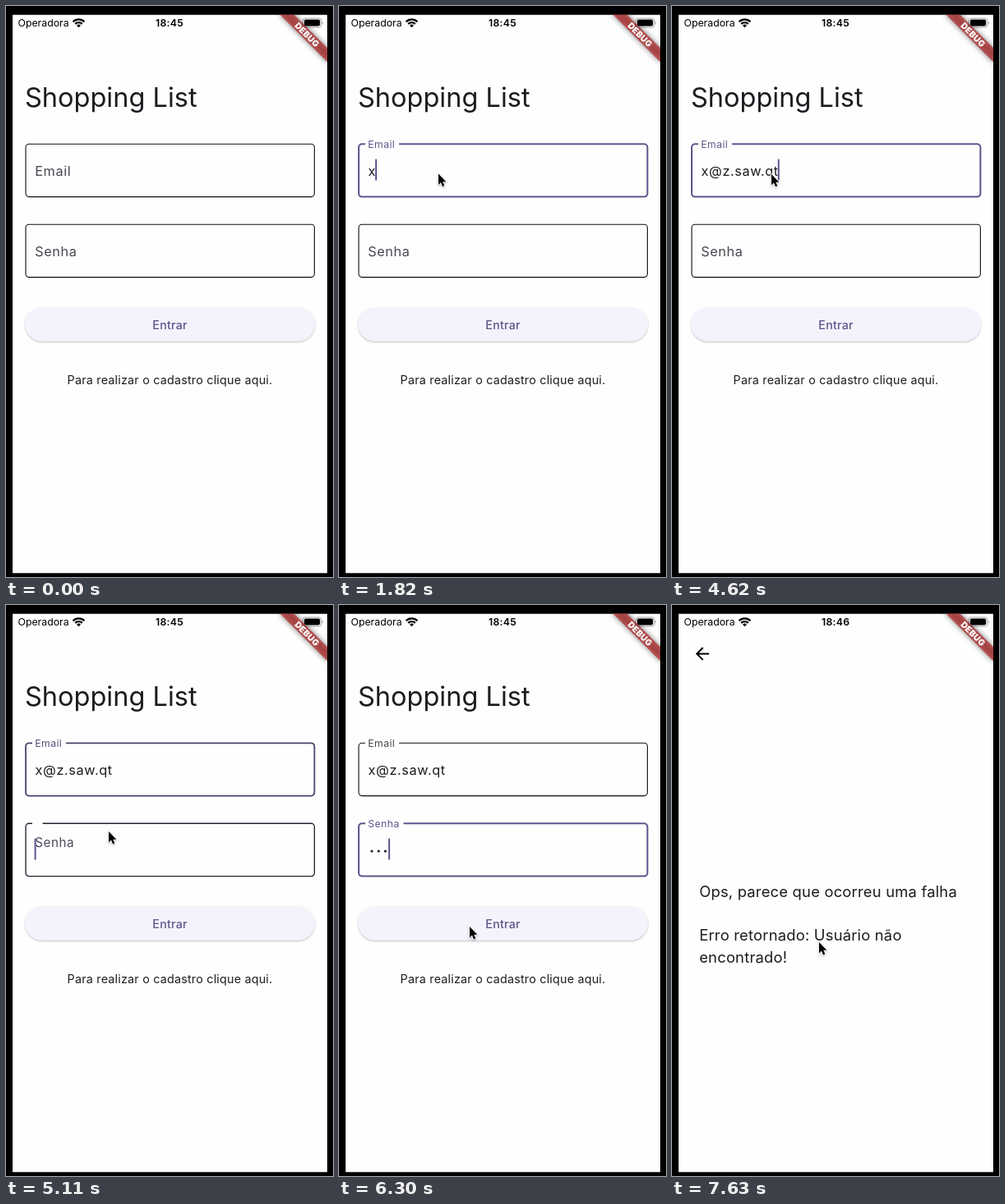
Recreate the animation shown at these times as an HTML page. Size 398 by 696 pixels, loop 8 s.

```html
<!DOCTYPE html>
<html lang="pt-BR">
<head>
<meta charset="utf-8">
<title>Login</title>
<style>
html, body { margin: 0; width: 100%; height: 100%; overflow: hidden; background: #000; }
svg { display: block; width: 100vw; height: 100vh; }
text { font-family: Inter, Roboto, sans-serif; font-optical-sizing: none; fill: #1d1b20; white-space: pre; }
.field { font-size: 16.3px; letter-spacing: .6px; }
.small { font-size: 14.3px; letter-spacing: .22px; text-anchor: middle; }
.page { font-size: 18.4px; letter-spacing: .2px; }
.status { font-size: 12.3px; fill: #000; }
</style>
</head>
<body>
<svg viewBox="0 0 398 696">
  <defs>
    <clipPath id="screen"><rect x="8" y="10.5" width="383" height="681"/></clipPath>
    <clipPath id="pill"><rect x="23.3" y="367.5" width="352.6" height="41" rx="20.5"/></clipPath>
    <filter id="blur" x="-50%" y="-150%" width="200%" height="400%"><feGaussianBlur stdDeviation="3.9"/></filter>
    <filter id="lift" x="-5%" y="-20%" width="110%" height="150%">
      <feDropShadow dx="0" dy="1" stdDeviation="1" flood-opacity=".3"/>
    </filter>
    <filter id="soft" x="-50%" y="-50%" width="200%" height="200%">
      <feDropShadow dx="0" dy="1" stdDeviation=".8" flood-opacity=".35"/>
    </filter>
  </defs>
  <rect width="398" height="696"/>
  <g clip-path="url(#screen)">
    <rect x="8" y="10.5" width="383" height="681" fill="#fefefe"/>
    <g id="login">
      <text x="23" y="123" font-size="32.5">Shopping List</text>
      <g id="email"></g>
      <g id="senha" transform="translate(0 98)"></g>
      <rect x="23.3" y="367.5" width="352.6" height="41" rx="20.5" fill="#f5f2fc" filter="url(#lift)"/>
      <circle id="ripple" cx="160" cy="393" fill="#5f558c" clip-path="url(#pill)"/>
      <text class="small" x="199.6" y="393.5" font-weight="500" style="fill:#5f558c">Entrar</text>
      <text class="small" x="199.5" y="461">Para realizar o cadastro clique aqui.</text>
    </g>
    <g id="error">
      <path transform="translate(24.7 47.2) scale(1.021)" d="M20 11H7.83l5.59-5.59L12 4l-8 8 8 8 1.41-1.41L7.83 13H20z"/>
      <text class="page" x="33.2" y="356">Ops, parece que ocorreu uma falha</text>
      <text class="page" x="33.2" y="409">Erro retornado: Usuário não</text>
      <text class="page" x="33.2" y="435.5">encontrado!</text>
    </g>
    <g transform="translate(391 10.5) rotate(45)">
      <rect x="-41" y="28.6" width="82" height="12.2" opacity=".5" filter="url(#blur)"/>
      <rect x="-41" y="28.6" width="82" height="12.2" fill="#b71c1c" fill-opacity=".63"/>
      <text y="38.5" text-anchor="middle" font-size="10.4" font-weight="900" letter-spacing=".2" style="fill:#fff">DEBUG</text>
    </g>
    <text class="status" x="14.5" y="25.3">Operadora</text>
    <text class="status" id="clock" x="182" y="25.3" font-weight="600" letter-spacing=".25"></text>
    <g fill="none" stroke="#000" stroke-width="2.2">
      <path d="M81.6 19.2a9.8 9.8 0 0 1 13.8 0"/>
      <path d="M84.2 21.9a6.1 6.1 0 0 1 8.6 0"/>
      <path d="M88.5 26.3l-2.5-2.6a3.6 3.6 0 0 1 5 0z" fill="#000" stroke="none"/>
    </g>
    <rect x="361.3" y="15" width="22.6" height="11" rx="3.2" fill="none" stroke="#000" stroke-opacity=".35"/>
    <rect x="363" y="16.6" width="19.2" height="7.8" rx="1.8"/>
    <path d="M385 18.8a2.2 2.2 0 0 1 0 3.6z" opacity=".4"/>
  </g>
  <path id="cursor" d="M0 0V13.4L3 10.6 5 15.4 7.3 14.4 5.3 9.7H9.4Z" stroke="#fff" stroke-width="1.3" paint-order="stroke" filter="url(#soft)"/>
</svg>
<script>
const LOOP = 8000;
const EMAIL_FOCUS = 890, SENHA_FOCUS = 5067, PRESS = 6790, SWITCH = 7080;
const ADDRESS = 'x@z.saw.qt';
const emailKeys = [1820, 2310, 2590, 3290, 3430, 3570, 3640, 3920, 4130, 4200];
const senhaKeys = [5600, 5740, 6290];
// time, x, y of the pointer tip
const pointer = [
  [140, 167, 618], [420, 117.5, 254], [630, 117.5, 254], [840, 121, 204.5],
  [4600, 121, 204.5], [5040, 125, 276], [5130, 125, 276], [5390, 127, 287],
  [5440, 127, 287], [5810, 159, 393], [6200, 159, 393], [6300, 159, 392],
  [7200, 159, 392], [7490, 179, 411]
];

const $ = id => document.getElementById(id);
const lerp = (a, b, k) => a + (b - a) * k;
const clamp = k => Math.min(1, Math.max(0, k));
const ramp = (t, start, length) => clamp((t - start) / length);
const smooth = k => k * k * (3 - 2 * k);
const mix = (a, b, k) => `rgb(${a.map((v, i) => Math.round(lerp(v, b[i], k)))})`;
const BLACK = [12, 12, 14], GREY = [73, 69, 79], PURPLE = [95, 85, 140];

// cubic-bezier(.4, 0, .2, 1), solved by bisection
function standard(x) {
  let lo = 0, hi = 1;
  for (let i = 0; i < 20; i++) {
    const s = (lo + hi) / 2, r = 1 - s;
    if (1.2 * r * r * s + .6 * r * s * s + s ** 3 < x) lo = s; else hi = s;
  }
  return lo * lo * (3 - 2 * lo);
}
const shift = (t, start) => standard(ramp(t, start, 167));

function makeField(id, label) {
  const g = $(id);
  g.innerHTML = `<path fill="none"/><text class="field">${label}</text>
    <text class="field" x="35.6" y="206.5"></text><g fill="#1d1b20"></g>
    <rect y="186.5" width="2" height="26.3" rx="1" fill="#5f558c"/>`;
  const [border, name, value, dots, caret] = g.children;
  const full = name.getComputedTextLength() * .75 + 8;
  return { border, name, value, dots, caret, full };
}

function drawField(f, float, focus) {
  const gap = 32 + f.full * float;
  const start = float ? 'H32' : 'H32Z';
  f.border.setAttribute('d', `M${gap} 168.3H371.4a4 4 0 0 1 4 4V228.6a4 4 0 0 1-4 4
    H28a4 4 0 0 1-4-4V172.3a4 4 0 0 1 4-4${start}`);
  f.border.setAttribute('stroke', mix(BLACK, PURPLE, focus));
  f.border.setAttribute('stroke-width', lerp(1.1, 2.04, focus));
  f.name.setAttribute('transform', `translate(35.2 ${lerp(206.5, 173, float)}) scale(${lerp(1, .75, float)})`);
  f.name.style.fill = mix(GREY, PURPLE, focus);
}

function blink(t, since) {
  const phase = (t - since) % 1060;
  return 1 - ramp(phase, 530, 140);
}

function drawCaret(f, t, focus, keys, width, active) {
  const typed = keys.filter(k => k <= t);
  f.caret.setAttribute('x', 34.6 + width);
  f.caret.setAttribute('opacity', active ? blink(t, typed.pop() ?? focus) : 0);
}

const count = (keys, t) => keys.filter(k => k <= t).length;
const email = makeField('email', 'Email');
const senha = makeField('senha', 'Senha');

function pointerAt(t) {
  const i = pointer.findIndex(p => p[0] > t);
  if (i < 0) return pointer.at(-1).slice(1);
  const a = pointer[Math.max(0, i - 1)], b = pointer[i];
  const k = smooth(ramp(t, a[0], b[0] - a[0] || 1));
  return [lerp(a[1], b[1], k), lerp(a[2], b[2], k)];
}

function draw(t) {
  const first = shift(t, EMAIL_FOCUS), second = shift(t, SENHA_FOCUS);
  drawField(email, first, first - second);
  drawField(senha, second, second);

  const chars = count(emailKeys, t);
  email.value.textContent = ADDRESS.slice(0, chars);
  drawCaret(email, t, EMAIL_FOCUS + 50, emailKeys, chars ? email.value.getComputedTextLength() : 0,
    t > EMAIL_FOCUS + 50 && t < SENHA_FOCUS);

  const dots = count(senhaKeys, t);
  senha.dots.innerHTML = Array.from({ length: dots }, (_, i) =>
    `<circle cx="${40 + 8.2 * i}" cy="202" r="1.6"/>`).join('');
  drawCaret(senha, t, SENHA_FOCUS, senhaKeys, dots * 8.5, t > SENHA_FOCUS);

  const press = ramp(t, PRESS, 300);
  $('ripple').setAttribute('r', press * 230);
  $('ripple').setAttribute('opacity', .1 * ramp(t, PRESS, 80));

  const swap = smooth(ramp(t, SWITCH, 200));
  $('login').setAttribute('opacity', 1 - swap);
  $('error').setAttribute('opacity', swap);
  $('clock').textContent = t < 7630 ? '18:45' : '18:46';

  $('cursor').setAttribute('transform', `translate(${pointerAt(t)})`);
  $('cursor').setAttribute('visibility', t < 140 ? 'hidden' : 'visible');
}

function tick() {
  draw(performance.now() % LOOP);
  requestAnimationFrame(tick);
}
tick();
</script>
</body>
</html>
```
